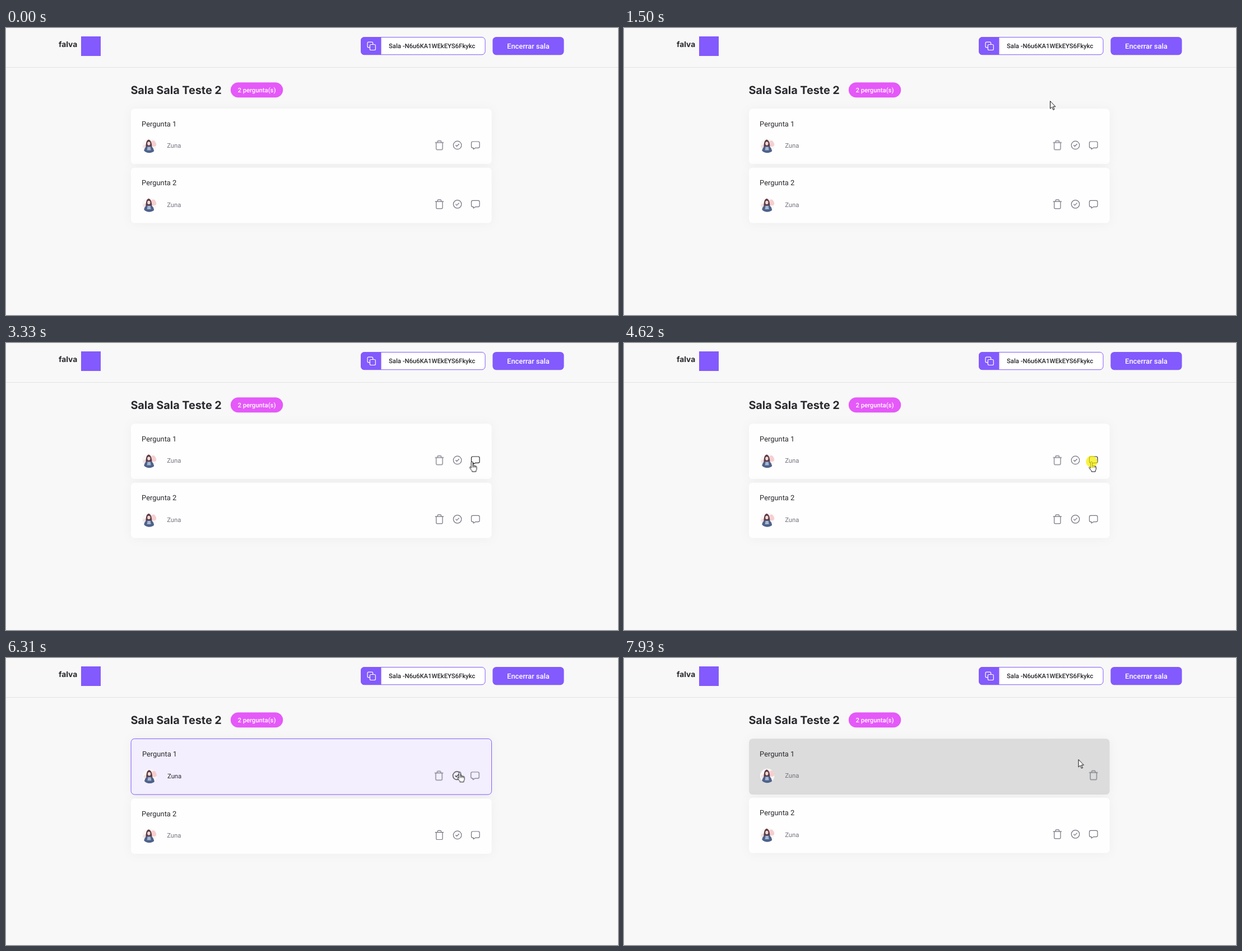
An HTML page for the animation above (8000 ms loop, 1092 px wide and 513 px high).

```html
<!DOCTYPE html>
<html lang="pt-BR">
<head>
<meta charset="utf-8">
<title>Sala</title>
<style>
  html, body { margin: 0; width: 100%; height: 100%; overflow: hidden; background: #f8f8f8; }
  svg { display: block; }
  text { font: 400 12.88px Roboto, sans-serif; fill: #29292e; text-rendering: geometricPrecision; }
  .small { font-size: 11.27px; }
  .medium { font-weight: 500; }
  .white { fill: #fff; }
  .mid { text-anchor: middle; }
  .gray { fill: #737380; }
  .brand { font: 700 13.8px Inter, sans-serif; }
  .title { font: 700 19.8px Inter, sans-serif; }
  .icon { fill: none; stroke: currentColor; stroke-width: 1.5; stroke-linecap: round; stroke-linejoin: round; }
  .icons { color: #737380; }
  .card { fill: #fefefe; filter: drop-shadow(0 1.6px 9px rgba(0, 0, 0, .04)); }

  .step { animation: 8s step-end infinite; }
  .bg { animation-name: bg; }
  .body { animation-name: body; }
  .row { animation-name: row; }
  .name { animation-name: name; }
  .next { animation-name: next; }
  .trash { animation-name: trash; }
  .open { animation-name: open; }
  .check { animation-name: check; }
  .reply { animation-name: reply; }
  .arrow { animation-name: arrow; }
  .hand { animation-name: hand; }
  .click1 { animation-name: click1; }
  .click2 { animation-name: click2; }
  .cursor { animation: move 8s linear infinite; }

  /* question: plain, highlighted, answered */
  @keyframes bg {
    0% { fill: #fefefe; stroke: none; }
    58.875% { fill: #f3effe; stroke: #835afd; height: 99.8px; }
    94.875%, 100% { fill: #dbdcdb; stroke: none; }
  }
  @keyframes body {
    0%, 94.875%, 100% { transform: none; }
    58.875% { transform: translate(.8px, .8px); }
  }
  @keyframes row {
    0%, 94.875%, 100% { transform: none; }
    58.875% { transform: translate(-.8px, .8px); }
  }
  @keyframes name {
    0%, 94.875%, 100% { fill: #737380; }
    58.875% { fill: #29292e; }
  }
  @keyframes next {
    0%, 94.875%, 100% { transform: none; }
    58.875% { transform: translateY(1.6px); }
  }
  @keyframes trash {
    0% { transform: none; }
    94.875%, 100% { transform: translateX(64.4px); }
  }
  @keyframes open {
    0% { visibility: visible; }
    94.875%, 100% { visibility: hidden; }
  }

  /* hover */
  @keyframes check {
    0%, 30.6%, 94.875%, 100% { color: #737380; }
    27.1%, 78.1% { color: #29292e; }
  }
  @keyframes reply {
    0%, 63.1%, 100% { color: #737380; }
    34.125% { color: #29292e; }
  }

  /* pointer */
  @keyframes arrow {
    0%, 30.6%, 63.1%, 94.875%, 100% { opacity: 1; }
    27.1%, 34.125%, 78.1% { opacity: 0; }
  }
  @keyframes hand {
    0%, 30.6%, 63.1%, 94.875%, 100% { opacity: 0; }
    27.1%, 34.125%, 78.1% { opacity: 1; }
  }
  @keyframes click1 {
    0%, 58.875%, 100% { opacity: 0; }
    57.75% { opacity: .72; }
  }
  @keyframes click2 {
    0%, 94.875%, 100% { opacity: 0; }
    93% { opacity: .72; }
  }
  @keyframes move {
    0%, 1.6% { transform: translate(1063px, 516px); animation-timing-function: cubic-bezier(.3, .3, .5, 1); }
    11.875%, 12.4% { transform: translate(861px, 140px); }
    15.6% { transform: translate(800px, 117px); }
    18.75% { transform: translate(760px, 130px); }
    20.5% { transform: translate(754px, 150px); animation-timing-function: ease-out; }
    22.625%, 23% { transform: translate(777px, 179px); }
    30% { transform: translate(815px, 216px); animation-timing-function: ease-out; }
    32.875%, 33.8% { transform: translate(821.5px, 217.5px); }
    34.125% { transform: translate(828px, 215px); animation-timing-function: ease-out; }
    36.5%, 40.5% { transform: translate(832.5px, 213.5px); }
    41.625%, 50% { transform: translate(831.5px, 212px); }
    50.25%, 60.8% { transform: translate(834px, 212px); animation-timing-function: ease-in-out; }
    69%, 71.2% { transform: translate(830.5px, 161px); animation-timing-function: ease-in-out; }
    80.375%, 81.3% { transform: translate(808.5px, 206px); animation-timing-function: ease-out; }
    85.625%, 95% { transform: translate(804.5px, 209px); animation-timing-function: ease-out; }
    99.125%, 100% { transform: translate(810.5px, 181px); }
  }
</style>
</head>
<body>
<svg width="1092" height="513" viewBox="0 0 1092 513">
  <defs>
    <!-- 24 unit icons -->
    <path id="trash" class="icon" d="M3 6H21M8 6V4a2 2 0 0 1 2-2h4a2 2 0 0 1 2 2V6M19 6V20a2 2 0 0 1-2 2H7a2 2 0 0 1-2-2V6"/>
    <path id="check" class="icon" d="M3 12a9 9 0 1 0 18 0a9 9 0 1 0-18 0M8.4 12.3l2.2 2.2 4.9-4.9"/>
    <path id="reply" class="icon" d="M12 18h6a3 3 0 0 0 3-3V7a3 3 0 0 0-3-3H6a3 3 0 0 0-3 3v8a3 3 0 0 0 3 3h1.5v3z"/>
    <clipPath id="round"><circle r="12.9"/></clipPath>
    <g id="avatar" clip-path="url(#round)">
      <circle r="12.9" fill="#fbf7f7"/>
      <circle cx="8" cy="-4" r="5.5" fill="#f6cfd0"/>
      <circle cx="-8" cy="1" r="3" fill="#f3e0e1"/>
      <path d="M-6 6Q-7-10-1-11Q5-10 5 6z" fill="#5c3b45"/>
      <ellipse cx="-.8" cy="-4" rx="2.6" ry="3.2" fill="#f1d9d2"/>
      <path d="M-10 13Q-9 2-4 1H3Q8 2 9 13z" fill="#4d628c"/>
      <path d="M-3 2H2L3 8H-4z" fill="#a9b6cf"/>
    </g>
  </defs>

  <rect width="1092" height="513" fill="#f8f8f8"/>
  <rect y="70" width="1092" height="1" fill="#e2e2e2"/>

  <text class="brand" x="94" y="33.5">falva</text>
  <rect x="134" y="15" width="35" height="35" fill="#835afd"/>

  <rect x="633.5" y="16.5" width="221.5" height="31.2" rx="6" fill="#fff" stroke="#835afd"/>
  <path d="M669.5 16V48H639.4a6.4 6.4 0 0 1-6.4-6.4V22.4a6.4 6.4 0 0 1 6.4-6.4z" fill="#835afd"/>
  <g fill="none" stroke="#fff" stroke-width="1.2" stroke-linejoin="round">
    <rect x="649.3" y="29.5" width="10" height="10" rx="2"/>
    <path d="M649.3 34.8h-2.3a2 2 0 0 1-2-2v-5.6a2 2 0 0 1 2-2h5.6a2 2 0 0 1 2 2v2.3"/>
  </g>
  <text class="small medium" x="683" y="36.3">Sala -N6u6KA1WEkEYS6Fkykc</text>
  <rect x="868.3" y="16" width="127.2" height="32.2" rx="6.4" fill="#835afd"/>
  <text class="medium white mid" x="931.9" y="37">Encerrar sala</text>

  <text class="title" x="222.4" y="117.6">Sala Sala Teste 2</text>
  <rect x="400.8" y="97.2" width="93.4" height="27" rx="13.5" fill="#e559f9"/>
  <text class="small medium white mid" x="447.4" y="114.8">2 pergunta(s)</text>

  <g>
    <rect class="card step bg" x="223.1" y="144.3" width="643.4" height="98.8" rx="6.4"/>
    <g class="step body">
      <text x="242.1" y="175.5">Pergunta 1</text>
      <use href="#avatar" x="255.6" y="210.5"/>
      <text class="small step name" x="287.2" y="214.2">Zuna</text>
    </g>
    <g class="icons step row">
      <g class="step trash"><use href="#trash" transform="translate(763.6 199.8) scale(.805)"/></g>
      <g class="step open">
        <g class="step check"><use href="#check" transform="translate(795.8 199.8) scale(.805)"/></g>
        <g class="step reply"><use href="#reply" transform="translate(828 199.8) scale(.805)"/></g>
      </g>
    </g>
  </g>

  <g class="step next">
    <g transform="translate(0 105.4)">
      <rect class="card" x="223.1" y="144.3" width="643.4" height="98.8" rx="6.4"/>
      <text x="242.1" y="175.5">Pergunta 2</text>
      <use href="#avatar" x="255.6" y="210.5"/>
      <text class="small gray" x="287.2" y="214.2">Zuna</text>
      <g class="icons">
        <use href="#trash" transform="translate(763.6 199.8) scale(.805)"/>
        <use href="#check" transform="translate(795.8 199.8) scale(.805)"/>
        <use href="#reply" transform="translate(828 199.8) scale(.805)"/>
      </g>
    </g>
  </g>

  <g class="cursor" fill="#fff" stroke="#111" stroke-linejoin="round">
    <path class="step arrow" d="M.5 .5V14l3.1-3 2.3 5.2 2-.9-2.2-5H9.8z"/>
    <path class="step hand" d="M-1.5 11.5V1.7a1.5 1.5 0 0 1 3 0V7.2q1.2-.9 2.4.3q1.3-.7 2.4.5q1.8-.3 2 1.6v3.6q0 1.6-1.2 3v1.8h-7v-1.6q-2.2-2-4-5.2q-.6-1.4.4-1.8q1.2-.3 2 1.2zM1.5 7.2v3.3M3.9 7.5v3M6.3 8v2.6"/>
  </g>
  <circle class="step click1" cx="834.5" cy="212" r="10.4" fill="#f5ee00"/>
  <circle class="step click2" cx="804.3" cy="209.3" r="9.6" fill="#f5ee00"/>
</svg>
</body>
</html>
```
